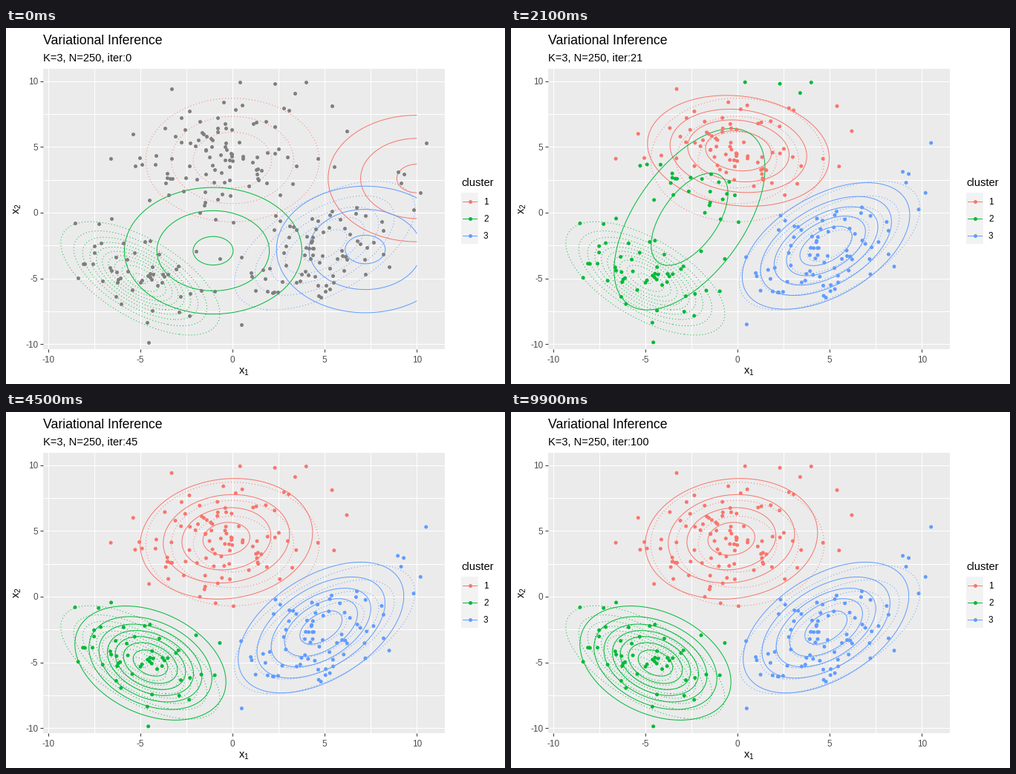
These frames come from a looping animation (672 by 480 pixels, 10000 ms). A matplotlib script:

```python
import matplotlib.pyplot as plt
import numpy as np
from matplotlib.animation import FuncAnimation
from matplotlib.patches import Rectangle

plt.rcParams.update({
    "font.family": "Liberation Sans",
    "axes.unicode_minus": False,
    "mathtext.fontset": "custom",
    "mathtext.rm": "Liberation Sans",
})

W, H, DPI = 672, 480, 96
FRAMES, LAST_ITER = 100, 100
PX = 72 / DPI  # one pixel in points
COLORS = ["#F8766D", "#00BA38", "#619CFF"]
GREY = "#7F7F7F"
STEP = 0.005  # density between contour lines

# Generating mixture: mean, variance, covariance
TRUTH = [((0, 4), 8, 0), ((-5, -5), 4, -2.5), ((5, -2.5), 7, 4)]


def start(mx, my):
    sd = 10 ** 0.5
    return mx, my, sd, sd, 0, 1 / 3


# Iteration -> mean x, mean y, sd x, sd y, correlation, weight
RED = {0: start(10, 2.6),
       12: (1.2, 4.1, 3.38, 2.44, -.21, .18),
       21: (.05, 4.7, 2.76, 2.36, -.13, .27),
       45: (-.33, 4.4, 2.70, 2.65, .10, .44)}
GREEN = {0: start(-1.05, -2.9),
         12: (-2.1, .8, 2.97, 5.17, .54, .52),
         21: (-2.6, -.5, 2.99, 5.04, .56, .43),
         35: (-4.25, -4.3, 2.09, 2.82, -.05, .23),
         45: (-4.45, -5.05, 2.02, 2.14, -.33, .22)}
BLUE = {0: start(7.2, -2.8),
        12: (4.8, -2.6, 2.40, 2.50, .49, .30),
        45: (4.8, -2.35, 2.42, 2.68, .48, .34)}
FITS = [RED, GREEN, BLUE]

SIZES = [102, 53, 83]
OUTLIERS = [(2.3, 9.8), (3.4, 9.1), (4, 9.9), (5.4, 8.1), (6.2, 6.2), (-3.3, 9.4),
            (-6.6, 4.1), (-8, -3.9), (.5, -8.5), (8.5, -4.1), (10.2, 1.5), (10.5, 5.3)]


def pose_at(poses, it):
    """Fast first updates, then even steps between the key poses."""
    keys = list(poses)
    if it < keys[1]:
        it = keys[1] * (it / keys[1]) ** 0.3
    return [np.interp(it, keys, values) for values in zip(*poses.values())]


def density(x, y, mx, my, sx, sy, rho):
    u, v, q = (x - mx) / sx, (y - my) / sy, 1 - rho * rho
    peak = 1 / (2 * np.pi * sx * sy * np.sqrt(q))
    return peak * np.exp(-(u * u + v * v - 2 * rho * u * v) / (2 * q))


def sample(rng, n, mx, my, sx, sy, rho):
    u, v = 0.92 * rng.standard_normal((2, n))
    v = rho * u + np.sqrt(1 - rho * rho) * v
    return np.column_stack([mx + sx * u, my + sy * v])


rng = np.random.default_rng(7)
clouds = [sample(rng, n, *pose_at(fit, LAST_ITER)[:5]) for n, fit in zip(SIZES, FITS)]
px, py = np.vstack([OUTLIERS, *clouds]).T
gx, gy = np.meshgrid(*[np.linspace(-10, 10, 161)] * 2)

fig = plt.figure(figsize=(W / DPI, H / DPI), dpi=DPI, facecolor="white")

# Panel
left, right, top, bottom = 50, 591, 55, 433
x0, y0, ux, uy = 305, 248.95, 24.83, 17.73  # origin and unit in pixels
ax = fig.add_axes([left / W, 1 - bottom / H, (right - left) / W, (bottom - top) / H])
ax.set_facecolor("#EBEBEB")
ax.set_xlim((left - x0) / ux, (right - x0) / ux)
ax.set_ylim((y0 - bottom) / uy, (y0 - top) / uy)
for axis in (ax.xaxis, ax.yaxis):
    axis.set_ticks(range(-10, 11, 5))
    axis.set_ticks(np.arange(-7.5, 10, 5), minor=True)
ax.grid(which="both", color="white", lw=PX)
ax.set_axisbelow(True)
ax.tick_params(length=2.75, width=PX, color="#333333",
               labelsize=8.8, labelcolor="#4D4D4D")
ax.tick_params(axis="x", pad=4.3)
ax.tick_params(axis="y", pad=2.2)
ax.tick_params(which="minor", length=0)
ax.spines[:].set_visible(False)

# Titles and legend in pixel coordinates
page = fig.add_axes([0, 0, 1, 1])
page.set_xlim(0, W)
page.set_ylim(H, 0)
page.axis("off")


def label(x, y, text, size, **kw):
    return page.text(x, y, text, fontsize=size, color="black",
                     **{"va": "baseline", **kw})


label(50, 22, "Variational Inference", 13.2)
subtitle = label(50, 45, "", 11)
label(320.5, 467, r"$\mathrm{x_1}$", 11, ha="center")
label(16, 243.5, r"$\mathrm{x_2}$", 11, rotation=90, ha="center", va="center")
label(613, 213, "cluster", 11)
for k, color in enumerate(COLORS):
    y = 233.5 + 23 * k
    page.add_patch(Rectangle((613, y - 11.5), 23, 23, fc="#F2F2F2", lw=0))
    page.plot([615, 634], [y, y], color=color, lw=PX)
    page.scatter([624.5], [y], s=14, color=color, lw=0)
    label(643, y + 4.5, str(k + 1), 8.8)


def draw_contours(params, color, **kw):
    z = density(gx, gy, *params)
    return ax.contour(gx, gy, z, levels=np.arange(STEP, z.max(), STEP),
                      colors=color, linewidths=PX, **kw)


for (mean, var, cov), color in zip(TRUTH, COLORS):
    sd = var ** 0.5
    draw_contours((*mean, sd, sd, cov / var), color, linestyles=[(0, (1, 3))])

dots = ax.scatter(px, py, s=14, lw=0, color=GREY, zorder=4)
contours = []


def update(frame):
    it = round(frame * LAST_ITER / (FRAMES - 1))
    poses = [pose_at(fit, it) for fit in FITS]
    for c in contours:
        c.remove()
    contours[:] = [draw_contours(p[:5], color, zorder=3)
                   for p, color in zip(poses, COLORS)]
    if it == 0:
        dots.set_facecolor(GREY)
    else:
        score = [p[5] * density(px, py, *p[:5]) for p in poses]
        dots.set_facecolor([COLORS[k] for k in np.argmax(score, axis=0)])
    subtitle.set_text(f"K=3, N=250, iter:{it}")
    return []


anim = FuncAnimation(fig, update, frames=FRAMES, interval=100,
                     init_func=lambda: [], repeat=True, repeat_delay=0)
plt.show()
```
